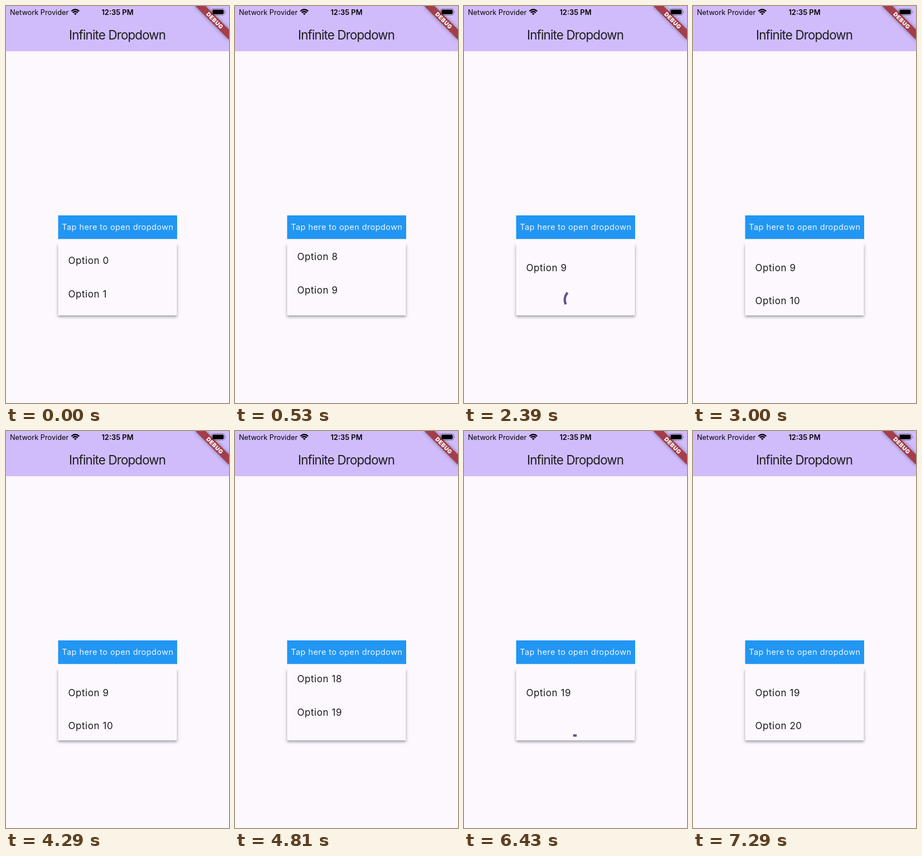
These frames come from a looping animation (400x711 px, 8 s). An HTML page:

```html
<!DOCTYPE html>
<html lang="en">
<head>
<meta charset="utf-8">
<title>Infinite Dropdown</title>
<style>
  html, body { margin: 0; width: 100%; height: 100%; overflow: hidden; background: #fdf8fd; }
  svg { display: block; width: 100%; height: 100%; font-family: Inter, Roboto, sans-serif; fill: #1d1b20; }
  #card { filter: drop-shadow(0 3px 2px #0004) drop-shadow(0 1px 3px #50408030); }
  #list text { font-size: 17px; letter-spacing: .55px; }
</style>
</head>
<body>
<svg viewBox="0 0 400 711">
  <defs>
    <clipPath id="viewport"><rect x="93.5" y="426" width="213" height="128"/></clipPath>
    <clipPath id="belowButton"><rect x="80" y="426" width="240" height="150"/></clipPath>
    <filter id="blur" x="-30%" y="-100%" width="160%" height="300%"><feGaussianBlur stdDeviation="3"/></filter>
  </defs>
  <rect width="400" height="711" fill="#fdf8fd"/>
  <rect width="400" height="81" fill="#d0bcfb"/>

  <text x="199.6" y="59.5" font-size="22.4" letter-spacing="-.85" text-anchor="middle">Infinite Dropdown</text>

  <g transform="translate(400 0) rotate(45)">
    <rect x="-43" y="30" width="86" height="12.8" filter="url(#blur)" opacity=".5"/>
    <rect x="-43" y="29.9" width="86" height="12.8" fill="#a53d4a"/>
    <text x=".3" y="40.1" font-size="10.2" font-weight="900" letter-spacing=".5" text-anchor="middle" fill="#fff">DEBUG</text>
  </g>

  <g fill="#000">
    <text x="7" y="15.7" font-size="12.75">Network Provider</text>
    <text x="200" y="15.7" font-size="12.9" font-weight="600" text-anchor="middle">12:35 PM</text>
    <g fill="none" stroke="#000" stroke-width="2.3">
      <path d="M117.3 9.3Q124.3 3.2 131.3 9.3M119.8 11.9Q124.3 8.2 128.8 11.9"/>
      <path d="M121.8 13.6Q124.3 11.8 126.8 13.6L124.3 16.2Z" fill="#000" stroke="none"/>
    </g>
    <rect x="368.8" y="4.8" width="23.4" height="11.6" rx="3.4" fill="none" stroke="#000" stroke-opacity=".4"/>
    <rect x="370.5" y="6.5" width="20" height="8.2" rx="2"/>
    <path d="M393.4 8.6q1.8 2 0 4z" opacity=".45"/>
  </g>

  <rect x="93.5" y="375" width="213.5" height="42.3" fill="#2196f3"/>
  <text x="200.4" y="401.3" font-size="14.5" letter-spacing=".42" text-anchor="middle" fill="#f2f6fd">Tap here to open dropdown</text>

  <g clip-path="url(#belowButton)"><rect id="card" x="93.5" y="426" width="213" height="128" fill="#fdf8fd"/></g>
  <g clip-path="url(#viewport)">
    <g id="list"><path id="spinner" fill="none" stroke="#67508f" stroke-width="4.27" stroke-linecap="square"/></g>
  </g>
</svg>
<script>
const LOOP = 8000, TOP = 426, VIEW = 128, ROW = 59.73, SPINNER_ROW = 55.47, PAGE = 10;
const list = document.getElementById('list');
const spinner = document.getElementById('spinner');

// Each fling: start, time until the list end is hit, spinner start, load end (ms).
const flings = [
  { start: 0, hit: 235, load: 902, done: 2995 },
  { start: 4290, hit: 248, load: 5228, done: 7285 }
];

const options = Array.from({ length: 3 * PAGE }, (_, i) => {
  const text = document.createElementNS('http://www.w3.org/2000/svg', 'text');
  text.setAttribute('x', 111.5);
  text.setAttribute('y', TOP + (i + .5) * ROW + 6.1);
  text.textContent = 'Option ' + i;
  return list.appendChild(text);
});

const clamp = x => Math.min(1, Math.max(0, x));
const endOf = pages => pages * PAGE * ROW - VIEW;

// cubic-bezier(.4, 0, .2, 1)
function fastOutSlowIn(x) {
  let low = 0, high = 1;
  for (let i = 0; i < 20; i++) {
    const u = (low + high) / 2, v = 1 - u;
    if (1.2 * v * v * u + .6 * v * u * u + u ** 3 < x) low = u; else high = u;
  }
  return 3 * low * low - 2 * low ** 3;
}

// Accelerate to the list end, spring back, then reveal the spinner row.
function scrollAt(time, fling, from, end) {
  const elapsed = time - fling.start;
  if (elapsed < fling.hit) return from + (end - from) * (elapsed / fling.hit) ** 1.5;
  const speed = 1.5 * (end - from) / fling.hit * 1000;
  const s = (elapsed - fling.hit) / 1000;
  const overshoot = speed / 12.96 * (Math.exp(-9.08 * s) - Math.exp(-22.04 * s));
  return end + overshoot + SPINNER_ROW * fastOutSlowIn(clamp((time - fling.load) / 300));
}

function arc(cx, cy, r, start, sweep) {
  const point = a => `${cx + r * Math.cos(a)} ${cy + r * Math.sin(a)}`;
  return `M${point(start)}A${r} ${r} 0 ${sweep > Math.PI ? 1 : 0} 1 ${point(start + sweep)}`;
}

function drawSpinner(elapsed, cy) {
  const phase = elapsed / 1333 % 1;
  const head = fastOutSlowIn(clamp(phase * 2));
  const tail = fastOutSlowIn(clamp(phase * 2 - 1));
  const start = Math.PI * (-.5 + 1.5 * tail + 2 * elapsed / 2222 + .5 * phase);
  spinner.setAttribute('d', arc(200, cy, 19.2, start, Math.max(1.5 * Math.PI * (head - tail), .001)));
}

function render(time) {
  const index = time < flings[1].start ? 0 : 1;
  const fling = flings[index];
  const from = index ? endOf(1) + SPINNER_ROW : 0;
  const loaded = PAGE * (index + (time < fling.done ? 1 : 2));
  const loading = time >= fling.load && time < fling.done;

  list.setAttribute('transform', `translate(0 ${-scrollAt(time, fling, from, endOf(index + 1))})`);
  options.forEach((option, i) => option.style.display = i < loaded ? '' : 'none');
  spinner.style.display = loading ? '' : 'none';
  if (loading) drawSpinner(time - fling.load, TOP + loaded * ROW + SPINNER_ROW / 2);
}

const origin = performance.now();
function tick() {
  render((performance.now() - origin) % LOOP);
  requestAnimationFrame(tick);
}
tick();
</script>
</body>
</html>
```
